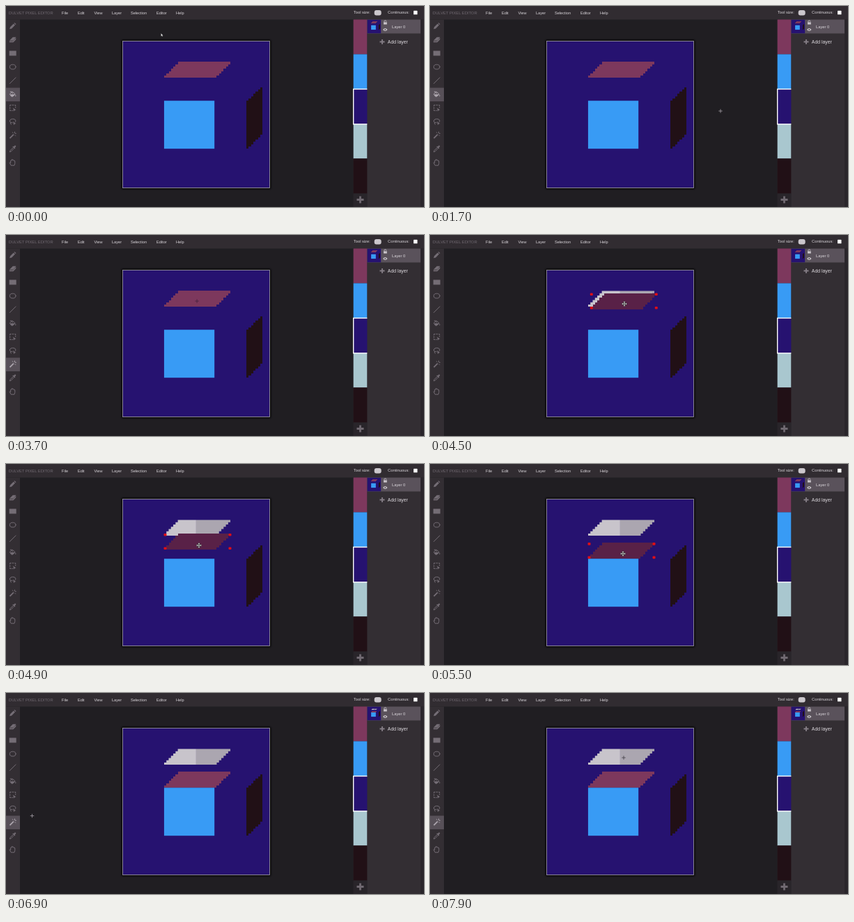
Write an HTML page that moves like this. It is 600 px wide and 289 px high and loops after 8000 ms.

```html
<!DOCTYPE html>
<html lang="en">
<head>
<meta charset="utf-8">
<title>Pixel editor</title>
<style>
  html, body { margin: 0; width: 100%; height: 100%; overflow: hidden; background: #201e22; }
  svg { display: block; width: 600px; height: 289px; }
  text { font: 5.8px "Liberation Sans", Arial, sans-serif; fill: #dbd7dc; }
  .stepped { shape-rendering: crispEdges; }
  #tools { color: #746d75; }
  #tools .active { color: #aca5ad; }
  .line { fill: none; stroke: currentColor; stroke-linecap: round; stroke-linejoin: round; }
  .solid { fill: currentColor; }
</style>
</head>
<body>
<svg viewBox="0 0 600 289" xmlns="http://www.w3.org/2000/svg">
  <defs>
    <filter id="soft" x="-10%" y="-10%" width="120%" height="120%"><feGaussianBlur stdDeviation="1.5"/></filter>
  </defs>
  <rect width="600" height="289" fill="#201e22"/>
  <rect width="600" height="19.5" fill="#312c31"/>
  <rect y="19.5" width="20" height="269.5" fill="#332e33"/>
  <rect x="498.5" y="19.5" width="20" height="269.5" fill="#29252a"/>

  <g id="menu"></g>
  <text x="499" y="11.4" style="font-size:5.7px">Tool size:</text>
  <rect x="528.7" y="6" width="10" height="7.5" rx="3" fill="#cbc7cc"/>
  <text x="548" y="11.4">Continuous:</text>
  <rect x="585" y="6.8" width="5.5" height="5.5" rx=".6" fill="#fff"/>

  <rect id="activeTool" width="20" height="19.5" fill="#575058"/>
  <g id="tools"></g>

  <g id="palette"></g>
  <path d="M508.5 273.5v10M503.5 278.5h10" stroke="#706971" stroke-width="2.8"/>

  <!-- Layer panel, overlapping the palette's right edge -->
  <rect x="518.4" y="19.5" width="81.6" height="269.5" fill="#332e33"/>
  <rect x="595" y="19.5" width="5" height="269.5" fill="#2a262b"/>
  <rect x="518.4" y="19.5" width="76.6" height="20" fill="#5a525b"/>
  <g id="thumb" transform="translate(518.6 19.7) scale(.306)"></g>
  <path d="M542.8 23.5v-1a1.6 1.6 0 0 1 3.2 0" fill="none" stroke="#c9c4ca" stroke-width=".9"/>
  <rect x="542" y="23.3" width="4.8" height="3.2" fill="#c9c4ca"/>
  <path d="M541 34q3.3-4 6.6 0q-3.3 4-6.6 0z" fill="#c9c4ca"/>
  <circle cx="544.3" cy="34" r="1.1" fill="#5a525b"/>
  <text x="554" y="31.5" style="font-size:5.8px">Layer 0</text>
  <path d="M540 48v7M536.5 51.5h7" stroke="#857e86" stroke-width="1.8"/>
  <text x="547.8" y="53.8" style="font-size:6.9px">Add layer</text>

  <rect x="166" y="49" width="214" height="214" fill="#000" filter="url(#soft)"/>
  <g id="canvas" transform="translate(167.8 50.8) scale(3.285)"></g>
  <rect x="167.5" y="50.5" width="211" height="211" fill="none" stroke="#9592a3" stroke-width=".9"/>
  <g id="corners" fill="#e00e16"></g>

  <g id="cursor">
    <path id="arrow" d="M-.5-1.7v4.2l1-.8 .7 1.4 .7-.4-.7-1.3h1.3z" fill="#fff" stroke="#222" stroke-width=".3"/>
    <path id="cross" d="M-2.7 0h5.400M0-2.7v5.400" stroke-width=".9"/>
    <g id="move">
      <path d="M-3 0h6M0-3v6" stroke="#111" stroke-width="2"/>
      <path d="M0-4l1.900 2h-3.800zM0 4l1.900-2h-3.800zM-4 0l2-1.900v3.800zM4 0l-2-1.900v3.800z" fill="#f2f0f2" stroke="#111" stroke-width=".5"/>
      <path d="M-2.5 0h5M0-2.5v5" stroke="#f2f0f2" stroke-width=".8"/>
    </g>
  </g>
</svg>
<script>
const $ = id => document.getElementById(id);
const LOOP = 8000, UNIT = 3.285;
const COLORS = { pink: '#7d385d', blue: '#389bf5', navy: '#261270', aqua: '#a9c7cf', black: '#211016' };
const SELECTED_PINK = '#592147';
const BUCKET = 5, WAND = 8, TOOL_PITCH = 19.62;
const CLICK = 3850, GRAB = 4150, RELEASE = 5450, DROP = 6720, PICK_WAND = 2620;

// Menu
[[4, 'DULVET PIXEL EDITOR'], [80, 'File'], [103, 'Edit'], [126.5, 'View'], [152, 'Layer'],
 [179, 'Selection'], [216, 'Editor'], [244, 'Help']].forEach(([x, label], i) => {
  $('menu').innerHTML += `<text x="${x}" y="11.5" style="${i ? 'font-size:5.6px' : 'fill:#716a72'}">${label}</text>`;
});

// Tool icons, each centred on 0,0
const line = d => `<path class="line" d="${d}"/>`;
const solid = d => `<path class="solid" d="${d}"/>`;
const pointer = solid('M.5 0l4.2 3.2-2 .3-1.2 1.7z');
const icons = [
  solid('M-4.5 4.5l.8-3 4.8-4.8 2.2 2.2-4.8 4.8zM1.8-4l.8-.8 2.2 2.2-.8.8z'),
  solid('M-4.8 1.5l5-5h4.6l-4 5zM-4.8 2.3h5.2l4.2-4.8v2.4l-3.8 4h-5.6z'),
  solid('M-5-3.5h10v7h-10z'),
  '<ellipse class="line" rx="4.3" ry="3.4"/>',
  line('M-4.3 4.3L4.3-4.3'),
  line('M-4-.5l3.5-3 4 3.5-3.5 3.3h-1.6zM-3.5-3.5q2-1.500 3.200 2.500') + solid('M-3.8.2h6.800l-3 3h-1.600zM4 .5q1.500 2.200.2 3-1.400-.6-.2-3z'),
  line('M-4-2.500v-1.500h1.500M-.5-4h1.500M3-4h1v1.500M-4-.5v1.500M-4 3v1h1.500M4-1v.8M-.8 4h1') + pointer,
  line('M-.5 1.800q-4 0-3.800-2.800.5-2.600 4.300-2.700 4 .1 4.300 2.700 0 .8-.6 1.500M-3 1.200q-1 1.800.6 3') + pointer,
  solid('M-4.800 3.800l5.500-5.500 1.200 1.200-5.500 5.500z') + line('M2.800-4.600v1.400M4.700-2.400h-1.200M-.2-4l.6.8M4 .8l-.7-.7'),
  line('M-4.200 4.200l.8-2 3.200-3.200 1.300 1.300-3.200 3.200z') + solid('M-.4-2.800l1-1 .8.8 1.600-1.700q1.700-.3 1.600 1.500l-1.700 1.700.8.8-1 1z'),
  line('M-2.600 4L-4.500.5q.3-1.200 1.500.2V-2.500q.7-1 1.400 0v-1.400q.9-1 1.600 0v.8q.9-.8 1.600 0v1q.9-.7 1.500 0V1.500L2.200 4.300h-4.200z')
];
icons.forEach((icon, i) => {
  $('tools').innerHTML += `<g transform="translate(9.700 ${28.7 + i * TOOL_PITCH})">${icon}</g>`;
});

// Palette
const rect = (x, y, w, h, fill) => `<rect x="${x}" y="${y}" width="${w}" height="${h}" fill="${fill}"/>`;
Object.values(COLORS).forEach((color, i) => {
  $('palette').innerHTML += rect(498.7, 19.4 + i * 50, 20, 50, color);
});
$('palette').innerHTML += rect(498, 118.8, 22, 51.800, '#fff') + rect(499.4, 120.2, 22, 49, COLORS.navy);

// Picture, in its own 64 x 64 pixels
const steps = (count, step) => Array.from({ length: count }, (_, i) => step(i)).join('');
const topFace = steps(7, i => `M${24 - i} ${9 + i}h23v1h-23z`);
const sideFace = steps(7, i => `M${54 + i} ${26 - i}h1v21h-1z`);

function picture(name) {
  return `<clipPath id="${name}Clip"><path class="stepped" d="${topFace}"/></clipPath>` +
    rect(0, 0, 64, 64, COLORS.navy) +
    `<g id="${name}Hole" clip-path="url(#${name}Clip)">` +
      rect(16, 0, 16, 16, '#c8c4cb') + rect(32, 0, 16, 16, '#aba6b0') + '</g>' +
    rect(18, 26, 22, 21, COLORS.blue) +
    `<path class="stepped" d="${sideFace}" fill="${COLORS.black}"/>` +
    `<path class="stepped" id="${name}Top" d="${topFace}"/>`;
}
$('canvas').innerHTML = picture('main');
$('thumb').innerHTML = picture('mini');
$('corners').innerHTML = [[228.5, 82], [321.5, 82], [228.5, 101.5], [321.5, 101.5]]
  .map(([x, y]) => `<rect x="${x - 2}" y="${y - 1.8}" width="4" height="3.6" rx="1"/>`).join('');

// Cursor path: time, x, y
const path = [
  [0, 223, 41], [400, 223, 41], [1500, 417, 151], [1900, 417, 151], [2550, 10, 187],
  [2800, 10, 187], [3600, 274, 95], [4150, 275, 95.5], [4500, 279, 99], [4900, 277, 117],
  [5300, 277, 129], [5500, 277, 129], [6100, 217, 134], [6350, 217, 134], [6680, 10, 187],
  [6820, 10, 187], [7200, 245, 98], [7600, 278, 93], [LOOP, 278, 93]
];

function cursorAt(t) {
  const i = path.findIndex(p => p[0] > t);
  const [t0, x0, y0] = path[i - 1], [t1, x1, y1] = path[i];
  const k = (t - t0) / (t1 - t0), e = k * k * (3 - 2 * k);
  return { x: x0 + (x1 - x0) * e, y: y0 + (y1 - y0) * e };
}

// The dragged shape snaps to whole picture pixels.
function offsetAt(t) {
  if (t < GRAB) return { x: 0, y: 0 };
  if (t >= RELEASE) return { x: 0, y: 10 };
  const c = cursorAt(t);
  return { x: Math.round((c.x - 276) / UNIT), y: Math.round((c.y - 96) / UNIT) };
}

const show = (id, on) => $(id).setAttribute('display', on ? 'inline' : 'none');
const place = (id, x, y) => $(id).setAttribute('transform', `translate(${x} ${y})`);

function render(t) {
  const c = cursorAt(t), offset = offsetAt(t);
  const selected = t >= CLICK && t < DROP, dropped = t >= DROP;

  place('mainTop', offset.x, offset.y);
  $('mainTop').setAttribute('fill', selected ? SELECTED_PINK : COLORS.pink);
  show('mainHole', t >= GRAB);
  place('corners', offset.x * UNIT, offset.y * UNIT);
  show('corners', selected);

  place('miniTop', 0, dropped ? 10 : 0);
  $('miniTop').setAttribute('fill', COLORS.pink);
  show('miniHole', dropped);

  const tool = t < PICK_WAND ? BUCKET : WAND;
  $('activeTool').setAttribute('y', 19.5 + tool * TOOL_PITCH);
  show('activeTool', !selected);
  [...$('tools').children].forEach((icon, i) => icon.classList.toggle('active', i === tool && !selected));

  const pointing = t < 420 || c.x < 20;
  place('cursor', c.x, c.y);
  show('arrow', pointing);
  show('move', selected && !pointing);
  show('cross', !selected && !pointing);
  const overTop = c.x > 230 && c.x < 320 && c.y > 80 && c.y < 103;
  $('cross').setAttribute('stroke', !overTop ? '#98939a' : dropped ? '#4b474e' : '#4a2340');
}

function frame(now) {
  render(now % LOOP);
  requestAnimationFrame(frame);
}
render(0);
requestAnimationFrame(frame);
</script>
</body>
</html>
```
